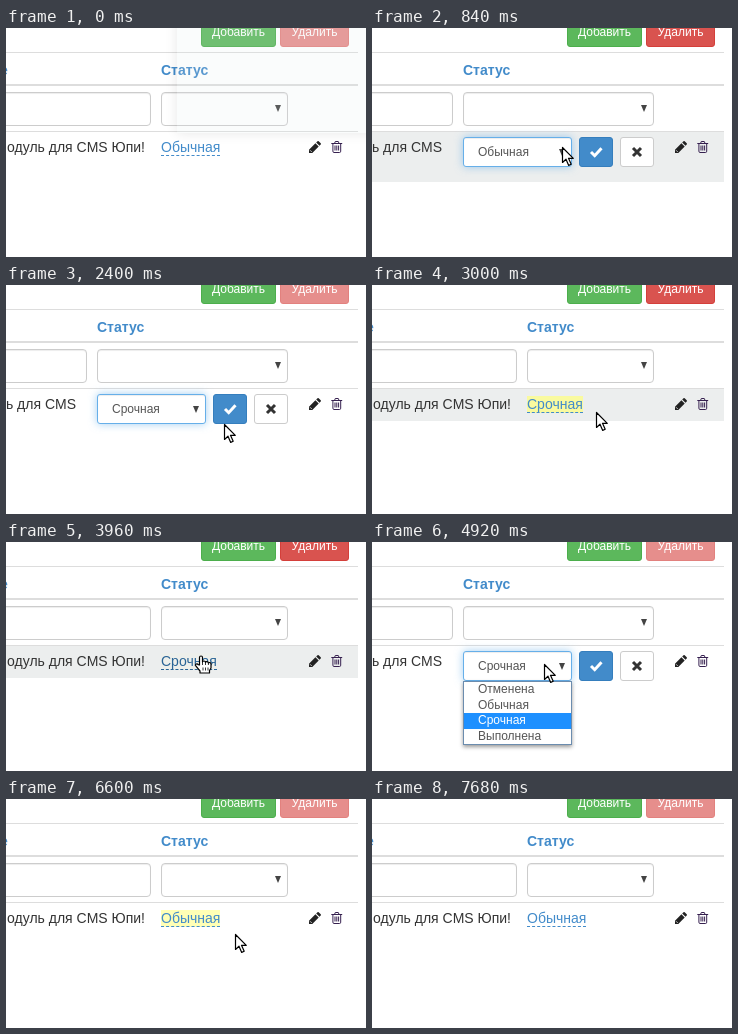
Recreate the animation shown at these times as an HTML page. Size 360 px wide and 229 px high, loop 7800 ms.

```html
<!DOCTYPE html>
<html lang="ru">
<head>
<meta charset="utf-8">
<style>
html, body { margin: 0; width: 100%; height: 100%; overflow: hidden; background: #fff; }
#stage { position: relative; width: 360px; height: 229px; overflow: hidden; color: #333;
  font: 14px/20px "Liberation Sans", Arial, sans-serif; }
#stage div, #stage svg { position: absolute; box-sizing: border-box; white-space: nowrap; }
.rule { left: 0; width: 352px; height: 1px; background: #ddd; }
.btn { top: -11px; height: 30px; padding: 5px 10px; border: 1px solid; border-radius: 3px;
  font-size: 12px; line-height: 18px; color: #fff; text-align: center; }
#add { left: 195px; width: 75px; background: #5cb85c; border-color: #4cae4c; }
#remove { left: 274px; width: 69px; background: #d9534f; border-color: #d43f3a; opacity: .65; }
.selected #remove { opacity: 1; }
.head { top: 32px; font-weight: bold; color: #428bca; }
#status { left: 155px; }
.field { top: 64px; height: 34px; border: 1px solid #ccc; border-radius: 4px; background: #fff;
  box-shadow: inset 0 1px 1px rgba(0,0,0,.075); }
#nameFilter { left: -20px; width: 165px; }
#statusFilter { left: 155px; width: 127px; }
#row { left: 0; top: 104px; width: 352px; height: 32px; }
.grey #row { background: #eceeee; }
#name { right: 221px; top: 109px; }
#link { left: 155px; top: 111px; height: 17px; line-height: 16px; color: #428bca;
  border-bottom: 1px dashed #428bca; }
.hand #link { color: #2a6496; border-color: #2a6496; }
#select { left: 91px; top: 109px; width: 109px; height: 30px; padding-left: 14px; background: #fff;
  border: 1px solid #66afe9; border-radius: 3px; font-size: 12px; line-height: 28px; color: #555;
  box-shadow: inset 0 1px 1px rgba(0,0,0,.075), 0 0 8px rgba(102,175,233,.6); }
.small { top: 109px; width: 34px; height: 30px; border: 1px solid; border-radius: 3px; }
#ok { left: 207px; background: #428bca; border-color: #357ebd; }
.pressed #ok { background: #3071a9; border-color: #285e8e; }
#cancel { left: 248px; background: #fff; border-color: #ccc; }
#popup { left: 91px; top: 139px; width: 109px; height: 64px; background: #fff;
  border: 1px solid #6b8cae; box-shadow: 0 2px 4px rgba(0,0,0,.4); }
#popup div { left: 0; width: 107px; height: 15.5px; padding-left: 14px; font-size: 12px;
  line-height: 15px; color: #555; }
#popup .active { background: #1e90ff; color: #fff; }
#notice { left: 171px; top: -20px; width: 220px; height: 125px; background: rgba(222,230,234,.9);
  box-shadow: 0 0 12px rgba(0,0,0,.6); }
.edit #status, .edit #statusFilter { left: 91px; }
.edit #statusFilter { width: 191px; }
.edit #nameFilter { width: 101px; }
.edit #row { height: 50px; }
.edit #name { right: 290px; }
.edit #link, .edit #title, .edit #tail, #stage:not(.edit) .editor { display: none; }
#stage:not(.open) #popup, .hand #arrow, #stage:not(.hand) #hand { display: none; }
</style>
</head>
<body>
<div id="stage">
  <div class="btn" id="add">Добавить</div>
  <div class="btn" id="remove">Удалить</div>
  <div class="rule" style="top:24px"></div>
  <div class="head" id="title" style="left:-6px">е</div>
  <div class="head" id="status">Статус</div>
  <div class="rule" style="top:56px;height:2px"></div>
  <div class="field" id="nameFilter"></div>
  <div class="field" id="statusFilter"></div>
  <svg style="left:269px;top:77px" width="6" height="7"><path d="M0 0H6L3 7Z" fill="#444"/></svg>
  <div id="row"></div>
  <div class="rule" style="top:103px"></div>
  <div id="name">Модуль для CMS<span id="tail"> Юпи!</span></div>
  <div id="link"></div>
  <svg style="left:302px;top:112px" width="13" height="14" fill="#222">
    <path d="M1 13V9.7L7.4 3.3L10.7 6.6L4.3 13ZM8.2 2.5L9.5 1.3Q10.1 .8 10.7 1.3L12.7 3.3Q13.2 3.9 12.7 4.5L11.5 5.8Z"/>
    <path d="M2 10.2L3.8 12" stroke="#fff" stroke-width=".7"/>
  </svg>
  <svg style="left:325px;top:112px" width="12" height="14" fill="none" stroke="#36204f">
    <path d="M.3 3.5H11.2M3.6 3.3L4.3 1.5H7.3L8 3.3M1.9 3.5V11.2Q1.9 12.5 3 12.5H8.6Q9.7 12.5 9.7 11.2V3.5M4 5.5V10.5M5.8 5.5V10.5M7.6 5.5V10.5"/>
  </svg>
  <div class="editor" id="select"></div>
  <svg class="editor" style="left:187px;top:121px" width="6" height="7"><path d="M0 0H6L3 7Z" fill="#444"/></svg>
  <div class="editor small" id="ok"></div>
  <div class="editor small" id="cancel"></div>
  <svg class="editor" style="left:207px;top:109px" width="75" height="30" fill="none" stroke-width="3">
    <path d="M12 15L15.7 18.7L22.5 11.2" stroke="#fff"/>
    <path d="M54 11L62 19M62 11L54 19" stroke="#333"/>
  </svg>
  <div id="popup"></div>
  <div id="notice"></div>
  <svg id="cursor" width="20" height="22" style="overflow:visible" fill="#fff" stroke="#000" stroke-linejoin="round">
    <path id="arrow" stroke-width="1.2" d="M.5 .5V15.5L4 12.2L6.7 18.4L9.2 17.3L6.5 11.3H11.3Z"/>
    <g id="hand" stroke-width="1.2">
      <path d="M-1.5 9V1.5Q-1.5 0 0 0T1.5 1.5V6Q1.7 5 3 5T4.5 6.3Q4.8 5.5 6 5.6T7.4 7Q8 6.3 9 6.6T10 8V12L8.5 14.5V17H-1V15L-5.2 9.8Q-5.9 8.5 -4.7 8T-2.8 8.6Z"/>
      <path d="M1.5 6V9M4.5 6.5V9M7.4 7V9M2 11.5V14.5M4.5 11.5V14.5M7 11.5V14.5" fill="none" stroke-width=".8"/>
    </g>
  </svg>
</div>
<script>
const LOOP = 7800, TICK = 120;
const $ = id => document.getElementById(id);
const options = ['Отменена', 'Обычная', 'Срочная', 'Выполнена'];

// Time spans in which each state holds
const states = {
  edit: [[720, 2760], [4440, 6240]],
  open: [[1200, 1920], [4920, 5520]],
  selected: [[600, 1920], [2760, 4440], [5520, 6000]],
  grey: [[360, 1920], [2760, 4440], [5520, 6600]],
  pressed: [[2520, 2760], [5880, 6240]],
  hand: [[480, 720], [2520, 2760], [3840, 4440], [5880, 6240]]
};
const saves = [2760, 6240];

// Pointer path: time, x, y
const path = [
  [240, 208, 152], [480, 192, 116], [720, 192, 116], [960, 188, 122], [1200, 188, 122],
  [1440, 176, 146], [1680, 174, 178], [1920, 174, 178], [2400, 218, 139], [2520, 224, 127],
  [3480, 224, 126], [3840, 195, 114], [4440, 194, 114], [4800, 172, 122], [5040, 172, 122],
  [5400, 172, 162], [5520, 172, 162], [5880, 224, 128], [6360, 224, 128], [6720, 232, 138],
  [6960, 254, 150]
];

const items = options.map((text, i) => {
  const item = document.createElement('div');
  item.textContent = text;
  item.style.top = i * 15.5 + 'px';
  $('popup').append(item);
  return item;
});

const within = (t, spans) => spans.some(([from, to]) => t >= from && t < to);

function pointer(t) {
  const i = path.findIndex(p => p[0] > t);
  if (i === 0) return null;
  if (i < 0) return t < path.at(-1)[0] + TICK ? path.at(-1).slice(1) : null;
  const [t0, x0, y0] = path[i - 1], [t1, x1, y1] = path[i];
  const k = (t - t0) / (t1 - t0);
  return [x0 + (x1 - x0) * k, y0 + (y1 - y0) * k].map(Math.round);
}

function glow(t) {
  const start = saves.find(s => t >= s && t < s + 1400);
  return start === undefined ? 0 : (1 - (t - start) / 1400) ** 1.8;
}

function draw(now) {
  const t = Math.floor((now % LOOP) / TICK + 1e-3) * TICK;
  for (const name in states) $('stage').classList.toggle(name, within(t, states[name]));

  const value = within(t, [[1920, 5520]]) ? 2 : 1;
  $('link').textContent = $('select').textContent = options[value];
  $('link').style.backgroundColor = `rgba(255,255,128,${glow(t)})`;
  $('notice').style.opacity = Math.max(0, .16 - t / 1500);

  const at = pointer(t);
  $('cursor').style.visibility = at ? 'visible' : 'hidden';
  if (at) $('cursor').style.transform = `translate(${at[0]}px,${at[1]}px)`;
  const active = at && at[1] >= 140 ? Math.floor((at[1] - 140) / 15.5) : value;
  items.forEach((item, i) => item.classList.toggle('active', i === active));
}

function loop() {
  draw(performance.now());
  requestAnimationFrame(loop);
}
loop();
</script>
</body>
</html>
```
